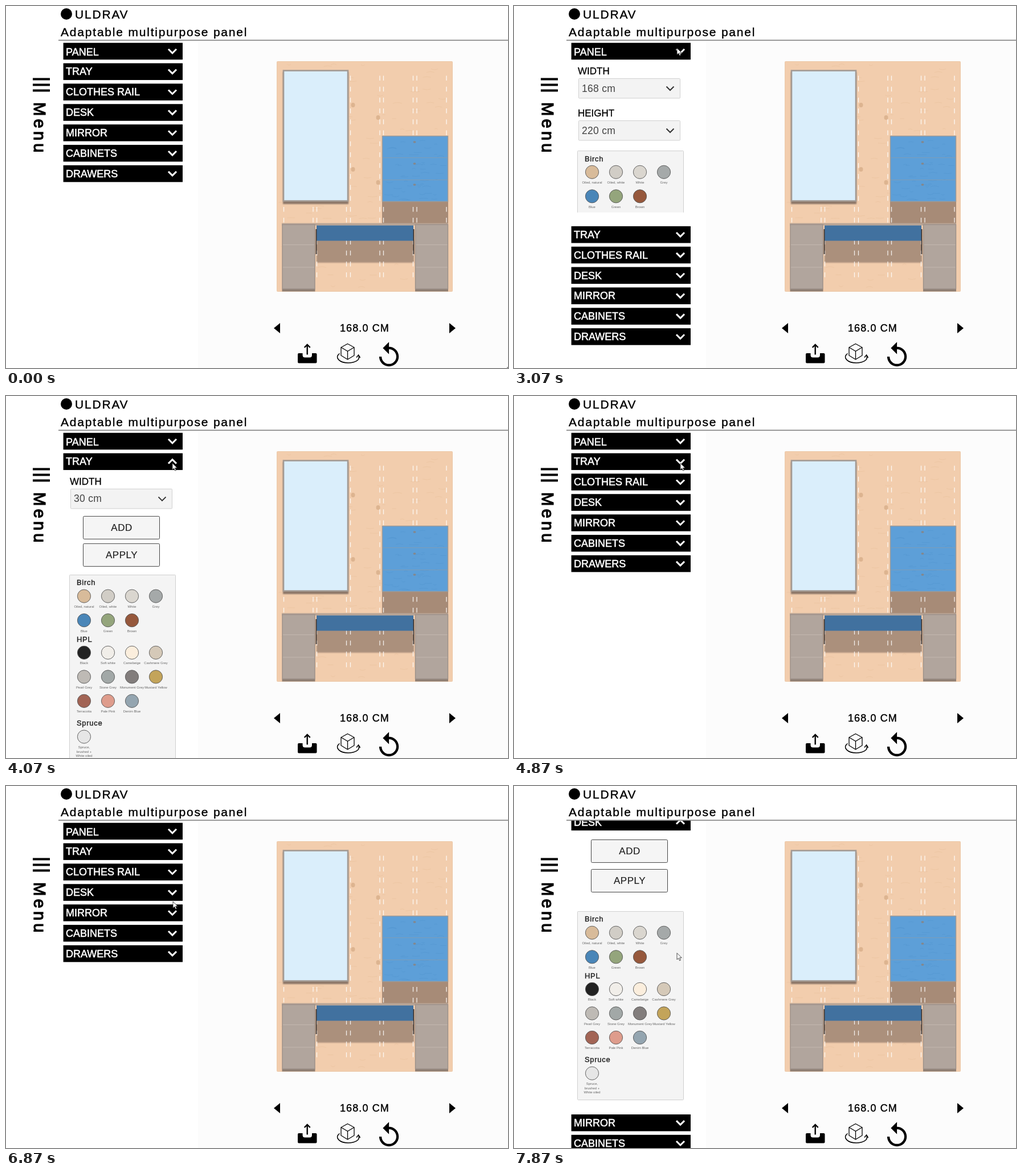
Animation, 881 px wide and 636 px high, one loop 8 s. Source, as an HTML page:

```html
<!DOCTYPE html>
<html lang="en">
<head>
<meta charset="utf-8">
<title>Panel configurator</title>
<style>
  html, body { margin: 0; width: 100%; height: 100%; overflow: hidden; background: #fff; }
  svg { display: block; }
  #stage { font-family: "Liberation Sans", Arial, sans-serif; }
  .title { font-size: 21px; letter-spacing: 1.8px; }
  .medium { stroke: currentColor; stroke-width: .4px; }
  .head { font-size: 18px; fill: #fff; stroke: #fff; stroke-width: .55px; }
  .label { font-size: 17px; stroke: #000; stroke-width: .3px; }
  .button { font-size: 17px; letter-spacing: .5px; text-anchor: middle; fill: #222; stroke: #222; stroke-width: .2px; }
  .group { font-size: 13px; letter-spacing: .7px; fill: #222; stroke: #222; stroke-width: .4px; }
  .tiny { font-size: 5.9px; text-anchor: middle; fill: #666; }
</style>
</head>
<body>
<svg id="stage" width="881" height="636" viewBox="0 0 881 636"></svg>
<script>
const LOOP = 8000, PITCH = 35.85, HEAD = 29, PAD = 18.5;

const rect = (x, y, w, h, fill, more = '') =>
  `<rect x="${x}" y="${y}" width="${w}" height="${h}" fill="${fill}" ${more}/>`;
const text = (x, y, cls, s, more = '') => `<text x="${x}" y="${y}" class="${cls}" ${more}>${s}</text>`;
const line = (d, stroke, width, more = '') =>
  `<path d="${d}" fill="none" stroke="${stroke}" stroke-width="${width}" ${more}/>`;

// Menu contents, measured from the bottom edge of their header
const birch = [['Oiled, natural', '#d8bb9a'], ['Oiled, white', '#d1cdc6'], ['White', '#dad6cf'], ['Grey', '#a5a9a9'],
  ['Blue', '#4a86b8'], ['Green', '#94a57c'], ['Brown', '#96583c']];
const hpl = [['Black', '#222'], ['Soft white', '#f1eee9'], ['Camebeige', '#fbeedd'], ['Cashmere Grey', '#d5c9b8'],
  ['Pearl Grey', '#bebab5'], ['Stone Grey', '#a2a8a7'], ['Monument Grey', '#827d7c'], ['Mustard Yellow', '#c3a45a'],
  ['Terracotta', '#a26455'], ['Pale Pink', '#de9c8c'], ['Denim Blue', '#94a5b0']];
const spruce = [['Spruce,|brushed +|White oiled', '#e6e6e6']];

const swatches = (y, name, list) => text(124, y, 'group', name) + list.map(([label, color], i) => {
  const cx = 137 + i % 4 * 42, cy = y + 19.3 + Math.floor(i / 4) * 42.5;
  return `<circle cx="${cx}" cy="${cy}" r="11.6" fill="${color}" stroke="#555" stroke-width=".9"/>` +
    label.split('|').map((s, n) => text(cx, cy + 20.4 + n * 7.5, 'tiny', s)).join('');
}).join('');
const box = (y, h) => rect(111.5, y + .5, 186, h - 1, '#f4f4f4', 'stroke="#cfcfcf" rx="1"');
const palette = y => box(y, 332) + swatches(y + 18.5, 'Birch', birch) +
  swatches(y + 117.7, 'HPL', hpl) + swatches(y + 265.5, 'Spruce', spruce);
const button = (y, s) => rect(135.5, y + .5, 134, 40, '#f5f5f5', 'stroke="#444" rx="2"') + text(203, y + 26, 'button', s);
const select = (y, name, value) => text(112, y + 26, 'label', name) +
  rect(113.5, y + 33.5, 178, 34.5, '#f3f3f3', 'stroke="#d0d0d0" rx="1"') +
  text(119, y + 56.5, '', value, 'font-size="17.5" letter-spacing=".3" fill="#444"') +
  line(`M267.5 ${y + 47.5}l6.5 6.5 6.5-6.5`, '#333', 2);

const rail = select(0, 'WIDTH', '30 cm') + button(81, 'ADD') + button(129, 'APPLY') + palette(184);
const sections = [
  { name: 'PANEL', height: 300, open: 2335, close: 3030,
    body: select(0, 'WIDTH', '168 cm') + select(74, 'HEIGHT', '220 cm') + box(160, 121) + swatches(178.5, 'Birch', birch) },
  { name: 'TRAY', height: 535, open: 3780, close: 4550, body: rail },
  { name: 'CLOTHES RAIL', height: 535, open: 5300, close: 6400, body: rail },
  { name: 'DESK', height: 492.5, open: 7070, close: 9000,
    body: button(16, 'ADD') + button(68, 'APPLY') + palette(142) },
  { name: 'MIRROR' }, { name: 'CABINETS' }, { name: 'DRAWERS' }
];
const section = ({ name, body = '' }, i) => `<g class="section">
  ${rect(100.6, -.3, 209.4, HEAD + .5, '#000')}${text(105, i ? 20.6 : 22, 'head', name)}
  ${line('M285 10.8l7 7 7-7', '#fff', 3, 'class="chevron"')}
  <svg class="body" y="${HEAD}" width="881" height="0">${body}</svg></g>`;

function furniture() {
  let seed = 7;
  const random = () => (seed = seed * 16807 % 2147483647) / 2147483647;
  const grain = (count, x0, y0, w, h, color) => {
    let s = '';
    for (let i = 0; i < count; i++) {
      const length = 5 + random() * 12, x = x0 + random() * (w - length), y = y0 + random() * h;
      s += line(`M${x} ${y}q${length / 2} ${random() * 8 - 4} ${length} 0`, color, 1, 'opacity=".25"');
    }
    return s;
  };
  let s = rect(475.5, 97.5, 308, 404, '#f2cdad', 'stroke="#ecc9a9" rx="1"') + grain(130, 478, 102, 303, 395, '#dcae84');
  for (const [x, y] of [[609, 174], [653, 196], [609, 287], [653, 310]])
    s += `<ellipse cx="${x}" cy="${y}" rx="3.5" ry="4" fill="#cfa47d" opacity=".6"/>`;
  s += rect(660, 343, 116, 39, '#a78b77') + rect(545, 411, 171, 40, '#ab907c', 'filter="url(#soft)"');
  for (const x of [487.5, 539, 545.5, 597.5, 604.5, 656, 662.5, 714.5, 721, 773])
    s += line(`M${x} 122.5V478`, '#fff', 1.3, 'stroke-dasharray="8.5 10.7" opacity=".85"');
  // mirror
  s += rect(486, 116, 115, 232, '#8d7767', 'filter="url(#soft)"') +
    rect(487, 113.5, 113, 229, '#daeefb', 'stroke="#a39a93" stroke-width="2.6"');
  // wall cabinet
  s += rect(660.5, 228.5, 115, 115, '#5d9fd8') + grain(45, 662, 231, 112, 110, '#4488c4') +
    line('M661 266.5h114M661 305.5h114', '#7d9db8', 1.2) +
    rect(660.5, 228.5, 115, 115, 'none', 'stroke="#9a9a9a" stroke-width="1.5"');
  for (const y of [239, 277, 314]) s += `<ellipse cx="717" cy="${y}" rx="2.5" ry="1.8" fill="#84878b"/>`;
  // desk
  s += rect(484, 381.5, 292, 4, '#b9a596') + rect(545, 385.5, 170, 27, '#41719f') +
    line('M544.5 392v44M715.5 392v44', '#443b36', 2);
  for (const x of [485, 718.5])
    s += rect(x - .5, 497, 58, 4.5, '#8f7f74') + rect(x, 384, 57, 113, '#b1a59d', 'stroke="#9c9089" stroke-width="1.4"') +
      line(`M${x + 1} 419.5h55M${x + 1} 459h55`, '#c3b8b0', 1.2);
  return s;
}

const controls = `<path d="M470 566l11-9v18zM789 566l-11-9v18z"/>
  ${text(586, 572, 'medium', '168.0 CM', 'font-size="18" letter-spacing="1.1"')}
  <path d="M514 610h6.5v3q0 4.500 4 4.500h8.500q4 0 4-4.500v-3h6.500q2 0 2 2v13.500q0 2-2 2H514q-2 0-2-2V612q0-2 2-2z"/>
  ${line('M528.7 612.5V597M523.7 600l5-5 5 5', '#000', 2.4)}
  ${line('M599.5 593.5l11.5 6.3v14.2l-11.5 7-11.5-7v-14.2zM588 599.8l11.5 6.7 11.5-6.7M599.5 606.5V621', '#000', 1.3)}
  ${line('M585.5 610.5c-10 7 0 16.5 15 16.5 13 0 21-5.5 18.5-12M615 617.5l3.6-4.5 3 5', '#000', 1.5)}
  <path transform="translate(646.3 588) scale(2.15)" d="M12 5V1L7 6l5 5V7c3.31 0 6 2.69 6 6s-2.69 6-6 6-6-2.69-6-6H4c0 4.42 3.58 8 8 8s8-3.58 8-8-3.58-8-8-8z"/>`;

const stage = document.getElementById('stage');
stage.innerHTML = `
  <filter id="soft" x="-10%" y="-10%" width="120%" height="120%"><feGaussianBlur stdDeviation="1"/></filter>
  ${rect(337, 61, 544, 575, '#fcfcfc')}
  <circle cx="106" cy="14" r="10"/>
  ${text(121, 21.5, 'title medium', 'ULDRAV')}
  ${text(96, 52.5, 'title medium', 'Adaptable multipurpose panel')}
  ${line('M47 128.5h30M47 138.5h30M47 148.5h30', '#000', 3.8)}
  ${text(0, 0, '', 'Menu', 'transform="translate(48.5 169) rotate(90)" font-size="29" letter-spacing="5.3" stroke="#000" stroke-width="1.3"')}
  <svg y="61" width="337" height="575"><g id="list">${sections.map(section).join('')}</g></svg>
  ${rect(92, 59.3, 789, 1.8, '#8c8c8c')}
  ${furniture()}${controls}
  <path id="cursor" d="M0 0v11.5l2.7-2.5 1.9 4.3 1.9-.9-1.9-4.1h3.7z" fill="#fff" stroke="#222" stroke-width=".8"/>`;

const list = document.getElementById('list'), cursor = document.getElementById('cursor');
const heads = [...document.querySelectorAll('.section')].map(g => ({
  g, chevron: g.querySelector('.chevron'), body: g.querySelector('.body') }));

// Pointer stops: time, x, y
const stops = [[1130, 882, 650], [1200, 866, 622], [2000, 292, 87], [2330, 286, 74], [3100, 286, 74], [3470, 289, 85],
  [3750, 292, 118], [4870, 292, 118], [5250, 286, 164], [5530, 285, 164], [5870, 287, 172], [6270, 287, 172],
  [6400, 290, 161], [6650, 291, 165], [6870, 293, 203], [7070, 292, 192], [7400, 292, 192], [7750, 286, 293.5], [8000, 286, 293.5]];

const swing = (t, start, span) => .5 - Math.cos(Math.PI * Math.min(1, Math.max(0, (t - start) / span))) / 2;

function pointer(t) {
  if (t < 400) return [880, 634.5];
  if (t < 1200) return [900, 650];
  const i = stops.findIndex(s => s[0] > t), [t0, x0, y0] = stops[i - 1], [t1, x1, y1] = stops[i];
  const p = swing(t, t0, t1 - t0);
  return [x0 + (x1 - x0) * p, y0 + (y1 - y0) * p];
}

function draw() {
  const t = performance.now() % LOOP;
  let shift = 0;
  heads.forEach(({ g, chevron, body }, i) => {
    const { height = 0, open, close } = sections[i];
    const shown = height ? swing(t, open, 300) - swing(t, close, 300) : 0;
    g.setAttribute('transform', `translate(0 ${4 + i * PITCH + shift})`);
    chevron.setAttribute('transform', t >= open && t < close ? 'translate(0 28.6) scale(1 -1)' : '');
    body.setAttribute('height', Math.max(0, shown * (height - PAD)));
    body.style.display = shown > 0 ? '' : 'none';
    shift += shown * height;
  });
  list.setAttribute('transform', `translate(0 ${-123.6 * swing(t, 7430, 400)})`);
  cursor.setAttribute('transform', `translate(${pointer(t)})`);
  requestAnimationFrame(draw);
}
draw();
</script>
</body>
</html>
```
